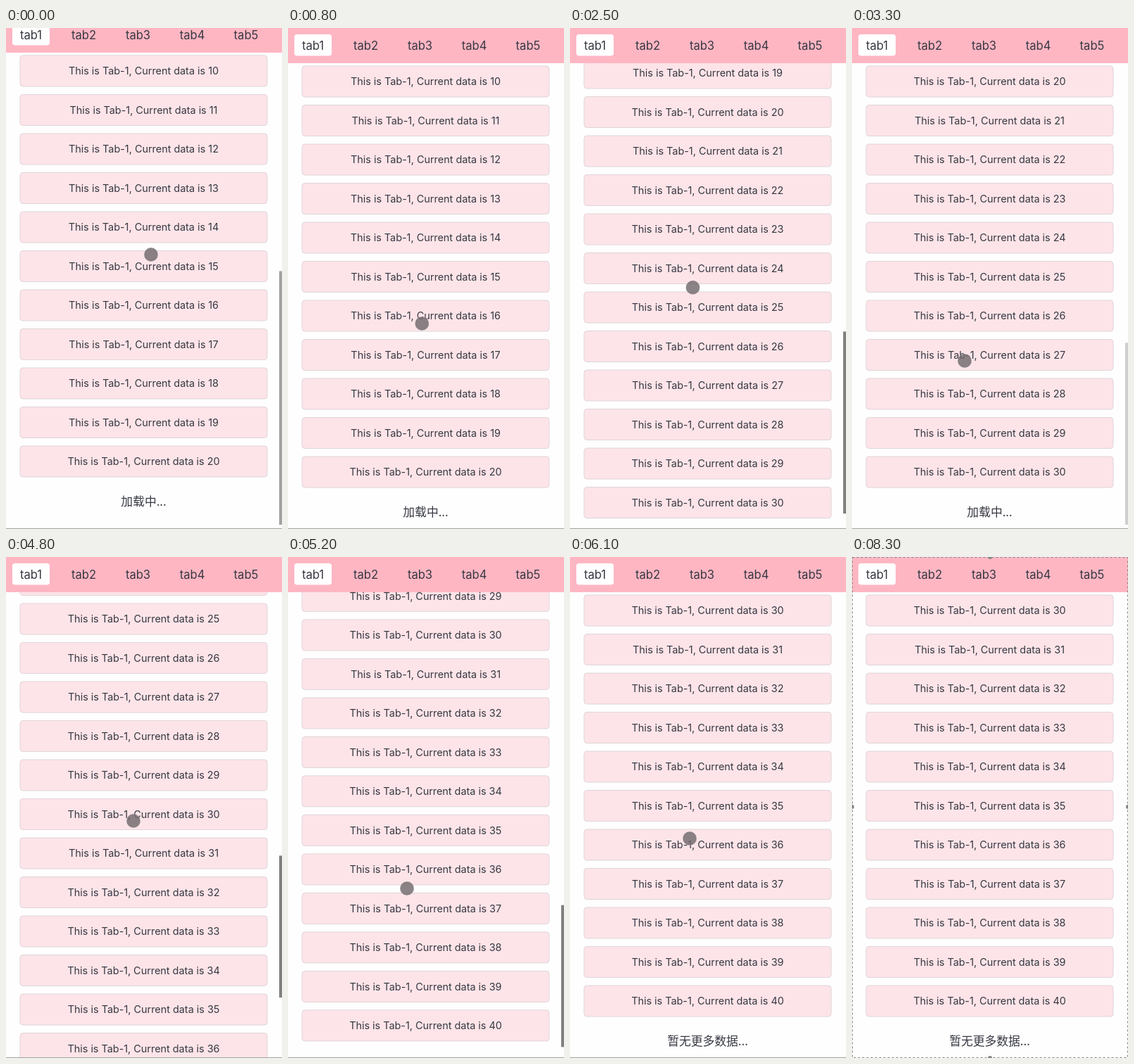
Recreate the animation shown at these times as an HTML page. Size 392x712 px, loop 9.1 s.

```html
<!DOCTYPE html>
<html lang="zh-CN">
<head>
<meta charset="utf-8">
<title>Tab list</title>
<style>
  html, body { margin: 0; width: 100%; height: 100%; overflow: hidden; background: #fefefe; }
  svg { display: block; width: 392px; height: 712px; }
  text { font-family: Inter, Roboto, "Noto Sans CJK SC", sans-serif; fill: #363842; text-anchor: middle; }
  .row { font-size: 14.4px; }
  .tab { font-size: 16.6px; }
  .foot { font-family: "Noto Sans CJK SC", "Noto Sans CJK", sans-serif; font-size: 16.8px; }
</style>
</head>
<body>
<svg id="stage" viewBox="0 0 392 712"></svg>
<script>
const LOOP = 9100, PITCH = 55.5;
const BATCH = 10 * PITCH;          // height of one loaded batch
const FIRST_END = 479;             // scroll limit with the first 20 rows
const FLICK = 1106;                // duration of one flick scroll
const flicks = [-1606, 1585, 4264]; // flick start times
const stage = document.getElementById('stage');

function add(parent, tag, attrs, label) {
  const node = document.createElementNS('http://www.w3.org/2000/svg', tag);
  for (const key in attrs) node.setAttribute(key, attrs[key]);
  if (label) node.textContent = label;
  return parent.appendChild(node);
}

const clamp = u => Math.min(1, Math.max(0, u));
const ease = u => (u = clamp(u), u * u * (3 - 2 * u));
const mix = (a, b, u) => a + (b - a) * u;
const show = (node, on) => node.setAttribute('display', on ? 'inline' : 'none');

// Each flick carries the list to the end of the next batch
const scrollAt = t => flicks.reduce(
  (sum, start) => sum + BATCH * ease((t - start) / FLICK), FIRST_END - BATCH);

// The scrollbar shows during a flick and fades out after it
function barOpacity(t) {
  const start = flicks.filter(f => f <= t).pop();
  return clamp((start + FLICK + 730 - t) / 318);
}

// Turning points of the touch dot: time, x, y
const touches = [[0, 206, 322], [1585, 175, 515], [2400, 175, 365], [3300, 160, 473],
  [4264, 165, 490], [4800, 181, 375], [5200, 169, 471], [6100, 170, 400]];

function touchAt(t) {
  const next = touches.findIndex(p => p[0] > t);
  if (next < 0) return touches[touches.length - 1].slice(1);
  const [t0, x0, y0] = touches[next - 1], [t1, x1, y1] = touches[next];
  const u = ease((t - t0) / (t1 - t0));
  return [mix(x0, x1, u), mix(y0, y1, u)];
}

add(stage, 'rect', { width: 392, height: 712, fill: '#fefefe' });
const page = add(stage, 'g', {});
const list = add(page, 'g', {});
const rows = Array.from({ length: 40 }, (_, i) => {
  const row = add(list, 'g', { transform: `translate(0 ${(i + 1) * PITCH})` });
  add(row, 'rect', { x: 20, y: -22, width: 351, height: 44, rx: 4, fill: '#fde4e8', stroke: '#dfd5d9' });
  add(row, 'text', { class: 'row', x: 195.5, y: 5.4 }, `This is Tab-1, Current data is ${i + 1}`);
  return row;
});
const foot = add(list, 'text', { class: 'foot', x: 195.5 });

add(page, 'rect', { width: 392, height: 50, fill: '#ffb6c3' });
add(page, 'rect', { x: 9, y: 9, width: 53, height: 30.5, rx: 4, fill: '#fff' });
[35.5, 110.5, 187.5, 264.5, 341].forEach((x, i) =>
  add(page, 'text', { class: 'tab', x, y: 31 }, `tab${i + 1}`));

const bar = add(stage, 'rect', { x: 388, width: 4, fill: '#808080' });
const edge = add(stage, 'rect', { y: 711, width: 392, height: 1, fill: '#a0a0a2' });
const cursor = add(stage, 'circle', { r: 10, fill: '#736b6f', 'fill-opacity': .84,
  stroke: '#fff', 'stroke-opacity': .3 });

const selection = add(stage, 'g', {});
add(selection, 'rect', { x: .5, y: .5, width: 391, height: 711, fill: 'none',
  stroke: '#858585', 'stroke-dasharray': '3 3' });
[[196, 0], [0, 355], [392, 355], [196, 712]].forEach(([cx, cy]) =>
  add(selection, 'circle', { cx, cy, r: 3, fill: '#858585' }));

function draw(t) {
  const loads = t < 1000 ? 0 : t < 4000 ? 1 : 2;
  const count = 20 + loads * 10;
  const max = FIRST_END + loads * BATCH;
  const scroll = scrollAt(t);
  page.setAttribute('transform', `translate(0 ${-15 * (1 - ease(t / 800))})`);
  list.setAttribute('transform', `translate(0 ${-scroll})`);
  rows.forEach((row, i) => {
    const y = (i + 1) * PITCH - scroll;
    show(row, i < count && y > 0 && y < 760);
  });
  foot.setAttribute('y', count * PITCH + 63);
  foot.textContent = count < 40 ? '加载中...' : '暂无更多数据...';

  const size = 508000 / (max + 930);
  bar.setAttribute('y', mix(59, 706 - size, (scroll + 25) / (max + 25)));
  bar.setAttribute('height', size);
  bar.setAttribute('opacity', barOpacity(t));

  const [x, y] = touchAt(t);
  cursor.setAttribute('cx', x);
  cursor.setAttribute('cy', y);
  show(cursor, t < 7600);
  show(edge, t < 7800);
  show(selection, t >= 7800);
}

const start = performance.now();
function tick() {
  draw((performance.now() - start) % LOOP);
  requestAnimationFrame(tick);
}
tick();
</script>
</body>
</html>
```
